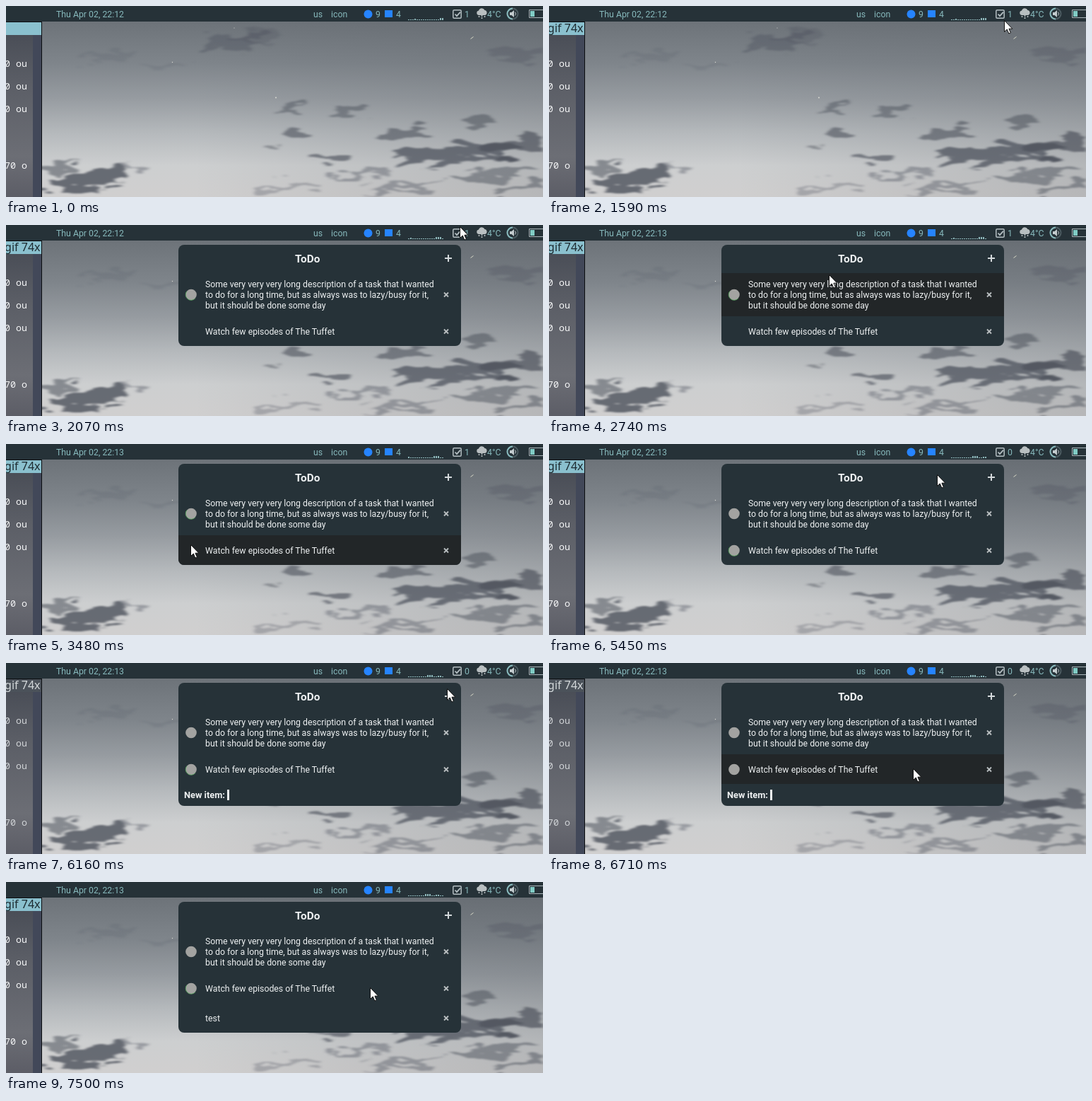
An HTML page that plays this animation: 760x270 px, repeating every 8 s.

```html
<!DOCTYPE html>
<html lang="en">
<head>
<meta charset="utf-8">
<title>Todo widget</title>
<style>
  html, body { margin: 0; width: 100%; height: 100%; overflow: hidden; background: #263238; }
  svg { position: absolute; left: 0; top: 0; width: 760px; height: 270px; }
  #sky { will-change: transform; }
  text { font: 12.3px Roboto, sans-serif; white-space: pre; }
  .bar text { fill: #87b9bc; }
  .popup text { fill: #eef1f2; }
  .popup .title { font-size: 15.4px; font-weight: 700; }
  .popup .label { font-size: 12.8px; font-weight: 700; }
  #term text { font: 13.3px "Noto Sans Mono", monospace; text-anchor: end; }
  #term #name { font: 16px "Noto Sans", sans-serif; }
</style>
</head>
<body>
<svg id="sky" viewBox="0 0 760 270">
  <defs>
    <linearGradient id="dusk" gradientUnits="userSpaceOnUse" x1="0" y1="22" x2="0" y2="270">
      <stop offset="0" stop-color="#6d7379"/>
      <stop offset=".24" stop-color="#7f858b"/>
      <stop offset=".44" stop-color="#979ca1"/>
      <stop offset=".64" stop-color="#b6babd"/>
      <stop offset=".82" stop-color="#cdcfd0"/>
      <stop offset="1" stop-color="#d0cfcf"/>
    </linearGradient>
    <linearGradient id="shade">
      <stop offset=".35" stop-color="#50555c" stop-opacity="0"/>
      <stop offset="1" stop-color="#50555c" stop-opacity=".2"/>
    </linearGradient>
    <filter id="wisp" filterUnits="userSpaceOnUse" x="0" y="0" width="760" height="290" color-interpolation-filters="sRGB">
      <feTurbulence type="fractalNoise" baseFrequency=".022 .07" numOctaves="3" seed="4"/>
      <feDisplacementMap in="SourceGraphic" scale="42" xChannelSelector="R" yChannelSelector="G"/>
      <feGaussianBlur stdDeviation="2.4 1.3"/>
    </filter>
  </defs>
  <rect width="760" height="270" fill="url(#dusk)"/>
  <rect width="760" height="270" fill="url(#shade)"/>
  <g id="clouds" fill="#4d525c" filter="url(#wisp)"></g>
  <g fill="#d9d9d2">
    <circle cx="382" cy="129.5" r="1"/>
    <circle cx="235.500" cy="79.500" r=".7"/>
    <circle cx="323" cy="31" r=".6"/>
    <path d="M657.500 46.500l4-3" stroke="#d9d9c8"/>
  </g>
</svg>

<svg viewBox="0 0 760 270">
  <defs>
    <linearGradient id="glass" x2="0" y2="1">
      <stop offset="0" stop-color="#4a4e57"/>
      <stop offset=".3" stop-color="#5b5e66"/>
      <stop offset=".75" stop-color="#6c6e75"/>
      <stop offset="1" stop-color="#5c5d66"/>
    </linearGradient>
    <clipPath id="frame"><rect id="frameBox" x="244" y="28" width="400" height="143" rx="8"/></clipPath>
  </defs>

  <g id="term">
    <rect y="22" width="51" height="248" fill="#0b0d10"/>
    <rect y="41" width="38" height="229" fill="url(#glass)"/>
    <rect x="38" y="41" width="12" height="229" fill="#424859"/>
    <rect id="head" y="23" width="50" height="18"/>
    <text id="name" x="48.500" y="37">gif 74x</text>
    <g id="lines">
      <text x="30" y="86">0 ou</text>
      <text x="30" y="118">0 ou</text>
      <text x="30" y="150">0 ou</text>
      <text x="30" y="230">70 o</text>
    </g>
  </g>

  <g class="bar">
    <rect width="760" height="22" fill="#263238"/>
    <text id="clock" x="71" y="16"></text>
    <text x="435" y="16">us</text>
    <text x="460" y="16">icon</text>
    <circle cx="512.500" cy="11.500" r="6" fill="#2684ff"/>
    <text x="523" y="16">9</text>
    <rect x="536" y="6" width="11" height="10" fill="#2684ff"/>
    <text x="552" y="16">4</text>
    <path id="graph" fill="#8fb9bc"/>
    <g fill="none" stroke="#b4bec2">
      <rect x="632.800" y="5.800" width="11.400" height="11.400" rx="1.500" stroke-width="1.500"/>
      <path d="M635.500 11.500l2.500 2.600l5-5.400" stroke-width="1.800"/>
    </g>
    <text id="count" x="649" y="16"></text>
    <path d="M669 13a3.300 3.300 0 0 1 0-6.500a4.500 4.500 0 0 1 8.500-.5a3.600 3.600 0 0 1 .5 7z" fill="#b9bfc1"/>
    <path d="M669.500 14v2M673.500 13v5.500M677.500 14v2" stroke="#b9bfc1" stroke-width="1.600" stroke-dasharray="2 1"/>
    <text x="681" y="16">4°C</text>
    <circle cx="717" cy="11" r="7.500" fill="none" stroke="#4c5b61" stroke-width="2"/>
    <path d="M717 18.500a7.500 7.500 0 0 1 0-15" fill="none" stroke="#87b9bc" stroke-width="2"/>
    <path d="M713 9h2.500l3.500-3v10l-3.500-3H713z" fill="#c3cbce"/>
    <path d="M720.500 8.500q2 2.500 0 5" fill="none" stroke="#c3cbce"/>
    <path d="M761 5.500H740.500v11H761" fill="none" stroke="#a9b5b9"/>
    <rect x="742" y="7" width="6" height="8" fill="#80cbc4"/>
  </g>

  <g id="popup" class="popup" clip-path="url(#frame)">
    <rect x="244" y="28" width="400" height="190" fill="#263238"/>
    <rect id="hover" x="244" width="400" fill="#222628"/>
    <text class="title" x="409" y="53">ToDo</text>
    <path d="M621 47h10M626 42v10" stroke="#d3d8da" stroke-width="2"/>
    <g id="rows"></g>
    <g id="prompt">
      <text class="label" x="252" y="191">New item:</text>
      <text id="typed" x="313" y="191"></text>
      <rect id="caret" y="179" width="3" height="15" fill="#eef1f2"/>
    </g>
  </g>

  <path id="mouse" d="M.5.500V16.500L4.300 13L6.800 19L9.400 17.900L6.900 12.200H11.800Z" fill="#fff" stroke="#111"/>
</svg>

<script>
const LOOP = 8000;
const $ = id => document.getElementById(id);
const show = (el, on) => el.setAttribute('visibility', on ? 'inherit' : 'hidden');
const set = (el, attrs) => { for (const k in attrs) el.setAttribute(k, attrs[k]); };

// Clouds: x, y, half width, half height, opacity
$('clouds').innerHTML = [
  [325, 52, 42, 10, .4], [350, 44, 30, 6, .25], [140, 72, 40, 5, .15], [225, 84, 32, 5, .15],
  [403, 147, 17, 4, .5], [486, 148, 29, 9, .5], [412, 182, 18, 8, .6], [376, 201, 12, 4, .45],
  [672, 162, 18, 9, .55], [565, 182, 34, 11, .6], [460, 216, 25, 7, .65], [640, 208, 95, 12, .75],
  [720, 198, 50, 12, .7], [730, 72, 45, 9, .3], [110, 246, 62, 13, .8], [75, 226, 30, 6, .55],
  [180, 230, 24, 4, .4], [400, 253, 45, 4, .3], [500, 241, 46, 5, .4], [565, 256, 60, 4, .4],
  [690, 236, 70, 7, .5], [735, 256, 50, 6, .5]
].map(([x, y, rx, ry, o]) =>
  `<ellipse rx="${rx}" ry="${ry}" opacity="${o}" transform="translate(${x} ${y}) rotate(-5)"/>`).join('');

const items = [
  { top: 68, h: 61, lines: ['Some very very very long description of a task that I wanted',
    'to do for a long time, but as always was to lazy/busy for it,',
    'but it should be done some day'] },
  { top: 129, h: 42, lines: ['Watch few episodes of The Tuffet'] },
  { top: 171, h: 42, lines: ['test'] }
];
$('rows').innerHTML = items.map(({ top, h, lines }, i) => {
  const mid = Math.floor(top + h / 2) + .5;
  const text = lines.map((s, n) =>
    `<text x="282" y="${mid + 4.5 + (n - (lines.length - 1) / 2) * 15}">${s}</text>`).join('');
  return `<g id="row${i}">
    <g id="done${i}"><circle cx="262" cy="${mid}" r="7.800" fill="#a3a3a1"/>
    <path id="rim${i}" d="M256 ${mid - 5}a7.800 7.800 0 0 0 12 10" fill="none" stroke="#55a85c" stroke-width=".8"/></g>
    ${text}<path d="M620 ${mid - 3}l6 6m0-6l-6 6" stroke="#b9bec0" stroke-width="1.800"/></g>`;
}).join('');

// Pointer stops: time, x, y
const path = [
  [670, 242, 237], [1010, 493, 91], [1310, 493, 91], [1590, 644, 20], [1690, 644, 20],
  [1980, 642, 2], [2390, 642, 2], [2740, 396, 70], [2890, 396, 70], [3290, 260, 134],
  [3400, 260, 134], [3600, 262, 156], [3790, 262, 156], [4080, 266, 108], [4220, 266, 108],
  [4300, 264, 127], [4460, 261, 144], [4910, 261, 144], [5110, 400, 95], [5330, 400, 95],
  [5450, 549, 43], [5640, 622, 44], [6040, 624, 42], [6160, 624, 36], [6680, 515, 149]
];
function pointer(t) {
  const n = path.findIndex(p => p[0] > t);
  if (n < 0) return path[path.length - 1].slice(1);
  if (!n) return path[0].slice(1);
  const [t0, x0, y0] = path[n - 1], [t1, x1, y1] = path[n];
  const u = (t - t0) / (t1 - t0), e = u * u * (3 - 2 * u);
  return [x0 + (x1 - x0) * e, y0 + (y1 - y0) * e];
}

const noise = n => Math.abs(Math.sin(n * 127.1 + 3) * 43758.5453) % 1;
function graph(tick) {
  let d = '';
  for (let i = 0; i < 17; i++) {
    const h = 1 + Math.floor(noise(i + tick) ** 4 * 3);
    d += `M${569 + i * 3} 20v${-h}h2v${h}z`;
  }
  return d;
}

const keys = [6820, 6890, 7060, 7180];

function draw(t) {
  const [x, y] = pointer(t);
  const open = t >= 2030, asking = t >= 6040 && t < 7420;
  const checked = t >= 4710, added = t >= 7460;

  $('clock').textContent = 'Thu Apr 02, 22:1' + (t < 2600 ? 2 : 3);
  $('count').textContent = checked && !added ? 0 : 1;
  $('graph').setAttribute('d', graph(Math.floor((t + 40) / 1010)));

  $('head').setAttribute('fill', asking ? '#4b525a' : '#8ac0ce');
  $('name').setAttribute('fill', asking ? '#d3d8da' : '#1d2b31');
  $('lines').setAttribute('fill', asking ? '#cfd2d5' : '#f4f5f6');
  show($('name'), t >= 40);

  show($('popup'), open);
  $('frameBox').setAttribute('height', added ? 185 : asking ? 174 : 143);

  // Rebuilding the list drops the highlight until the pointer moves again
  const stale = (t >= 4710 && t < 4950) || t >= 7420;
  const over = open && !stale ? items.findIndex(r => y >= r.top && y < r.top + r.h) : -1;
  show($('hover'), over >= 0);
  if (over >= 0) set($('hover'), { y: items[over].top, height: items[over].h });

  show($('done1'), checked);
  show($('done2'), false);
  show($('row2'), added);
  show($('rim0'), !checked);
  show($('rim1'), checked && over !== 1);

  show($('prompt'), asking);
  $('typed').textContent = 'test'.slice(0, keys.filter(k => t >= k).length);
  $('caret').setAttribute('x', 313 + $('typed').getComputedTextLength());

  show($('mouse'), t >= 710);
  $('mouse').setAttribute('transform', `translate(${Math.round(x)} ${Math.round(y)})`);
}

const start = performance.now();
function tick() {
  draw((performance.now() - start) % LOOP);
  requestAnimationFrame(tick);
}
tick();
</script>
</body>
</html>
```
